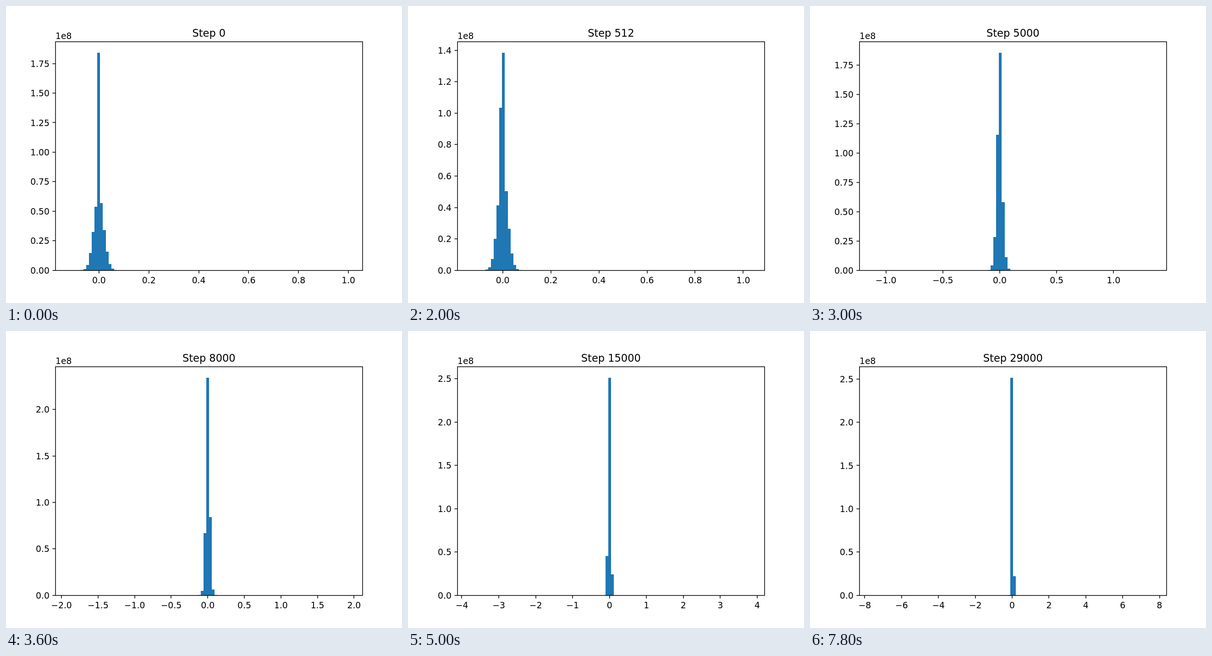
An HTML page for the animation above (8000 ms loop, 864 by 648 pixels).

```html
<!DOCTYPE html>
<html lang="en">
<head>
<meta charset="utf-8">
<title>Weight histogram by training step</title>
<style>
  html, body { margin: 0; width: 100%; height: 100%; overflow: hidden; background: #fff; }
  svg { display: block; width: 864px; height: 648px; font: 18.75px "DejaVu Sans", sans-serif; }
  path { fill: none; stroke: #000; stroke-width: 1.5; }
  .title { font-size: 22.5px; }
</style>
</head>
<body>
<svg id="chart" viewBox="0 0 864 648"></svg>
<script>
const FRAME_MS = 200, FRAMES = 40, BINS = 100;
const LEFT = 108, RIGHT = 777.6, TOP = 77.76, BOTTOM = 576.72;
const TOTAL = 4.048;    // weights, in units of 1e8
const CEILING = 2.5166; // the bin counters saturate here

// Smallest and largest weight by step: [step, min, max]
const RANGES = [
  [0, -.1184, 1], [128, -.1184, 1], [512, -.13, 1.03], [1000, -.2, 1.12],
  [2000, -.3575, 1.3013], [6000, -1.36, 1.355], [8000, -1.891, 1.9233],
  [11000, -2.69, 2.72], [15000, -3.74, 3.817], [21000, -5.36, 5.476],
  [22000, -5.63, 5.731], [29000, -7.528, 7.618]
];

// Counts on both sides of the central bin, from the outer tail inwards
const SHAPES = [
  { step: 0, centre: 10, left: [.002, .0105, .045, .146, .324, .537], right: [.002, .0145, .053, .159, .341, .569] },
  { step: 2000, centre: 21, left: [.003, .016, .073, .261, .7025], right: [.003, .019, .081, .2805, .756] },
  { step: 8000, centre: 49, left: [.002, .048, .669], right: [.002, .064, .8416] },
  { step: 15000, centre: 49, left: [.455], right: [.24] },
  { step: 22000, centre: 49, left: [.086], right: [.155] },
  { step: 29000, centre: 49, left: [.002], right: [.2235] }
];

const mix = (a, b, u) => a + (b - a) * u;

// Index of the interval of a sorted list that holds v
function interval(list, v, key) {
  let i = 0;
  while (i < list.length - 2 && key(list[i + 1]) <= v) i++;
  return i;
}

// Normal distribution function (logistic approximation) and its inverse
const normal = z => 1 / (1 + Math.exp(-1.5976 * z - .07056 * z ** 3));
function probit(p) {
  let lo = -8, hi = 8;
  for (let i = 0; i < 40; i++) {
    const mid = (lo + hi) / 2;
    if (normal(mid) < p) lo = mid; else hi = mid;
  }
  return lo;
}

function rangeAt(step) {
  const i = interval(RANGES, step, r => r[0]);
  const [a, b] = [RANGES[i], RANGES[i + 1]];
  const u = (step - a[0]) / (b[0] - a[0]);
  return [mix(a[1], b[1], u), mix(a[2], b[2], u)];
}

// Turn each shape into [weight, z-score] knots at its bin edges
for (const shape of SHAPES) {
  const [min, max] = rangeAt(shape.step);
  const edge = k => min + (max - min) * k / BINS;
  const side = (counts, edgeIndex, sign) => {
    let sum = 0;
    return counts.map((n, i) => {
      sum += n;
      return [edge(edgeIndex(counts.length - 1 - i)), sign * probit(sum / TOTAL)];
    });
  };
  shape.knots = [
    ...side(shape.left, d => shape.centre - d, 1),
    ...side(shape.right, d => shape.centre + 1 + d, -1).reverse()
  ];
}

function score(knots, x) {
  const i = interval(knots, x, k => k[0]);
  const [a, b] = [knots[i], knots[i + 1]];
  return mix(a[1], b[1], (x - a[0]) / (b[0] - a[0]));
}

function histogram(step, min, max) {
  const i = interval(SHAPES, step, s => s.step);
  const [a, b] = [SHAPES[i], SHAPES[i + 1]];
  const u = (step - a.step) / (b.step - a.step);
  const below = k => {
    const x = min + (max - min) * k / BINS;
    return normal(mix(score(a.knots, x), score(b.knots, x), u));
  };
  return Array.from({ length: BINS }, (_, k) => {
    const n = TOTAL * (below(k + 1) - below(k));
    return n / (1 + (n / CEILING) ** 14) ** (1 / 14);
  });
}

// At most nine intervals, with round steps
function ticks(lo, hi) {
  const raw = (hi - lo) / 9, power = 10 ** Math.floor(Math.log10(raw));
  const step = power * [1, 2, 2.5, 5, 10].find(s => s * power >= raw);
  let digits = 0;
  while (Math.abs(step - +step.toFixed(digits)) > 1e-9) digits++;
  const list = [];
  for (let i = Math.ceil(lo / step); i * step <= hi; i++) {
    list.push([i * step, (i * step).toFixed(digits).replace("-", "\u2212")]);
  }
  return list;
}

const text = (x, y, anchor, label, cls = "") =>
  `<text x="${x}" y="${y}" text-anchor="${anchor}" class="${cls}">${label}</text>`;

function stepOf(frame) {
  if (frame === 0) return 0;
  return frame < 11 ? 2 ** (frame - 1) : (frame - 10) * 1000;
}

function picture(step) {
  const [min, max] = rangeAt(step);
  const pad = (max - min) * .05, lo = min - pad, hi = max + pad;
  const counts = histogram(step, min, max);
  const top = Math.max(...counts) * 1.05;
  const px = x => LEFT + (RIGHT - LEFT) * (x - lo) / (hi - lo);
  const py = y => BOTTOM - (BOTTOM - TOP) * y / top;

  let bars = "", lines = "M108 78H778V577H108Z", labels = "";
  counts.forEach((n, k) => {
    const x0 = Math.round(px(min + (max - min) * k / BINS));
    const x1 = Math.round(px(min + (max - min) * (k + 1) / BINS));
    const y = Math.round(py(n));
    if (y < 577) bars += `<rect x="${x0}" y="${y}" width="${x1 - x0}" height="${577 - y}" fill="#1f77b4"/>`;
  });
  for (const [value, label] of ticks(lo, hi)) {
    const x = px(value);
    lines += `M${Math.round(x)} 577v6.56`;
    labels += text(x, 605, "middle", label);
  }
  for (const [value, label] of ticks(0, top)) {
    const y = py(value);
    lines += `M108 ${Math.round(y)}h-6.56`;
    labels += text(94.9, y + 7.1, "end", label);
  }
  return bars + `<path d="${lines}"/>` + labels +
    text(108, 72, "start", "1e8") + text(442.8, 66.5, "middle", "Step " + step, "title");
}

const chart = document.getElementById("chart");
let shown = -1;
function draw() {
  const frame = Math.floor(performance.now() / FRAME_MS) % FRAMES;
  if (frame !== shown) {
    shown = frame;
    chart.innerHTML = picture(stepOf(frame));
  }
  requestAnimationFrame(draw);
}
draw();
</script>
</body>
</html>
```
